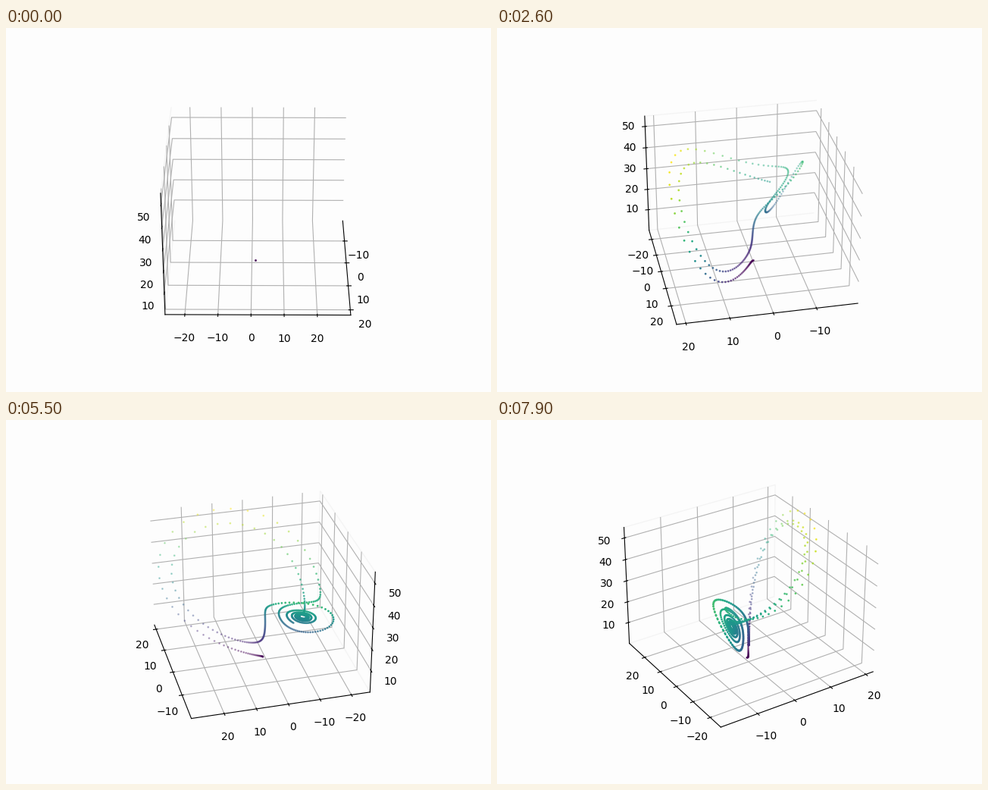
These frames come from a looping animation (640x480 px, 8 s). A matplotlib script:

```python
import numpy as np
import matplotlib.pyplot as plt
from matplotlib.animation import FuncAnimation

FRAMES, INTERVAL = 80, 100
STEPS = 10  # new points per frame
BG = "#fdfdfd"


def lorenz(n, dt=0.01, s=10, r=28, b=8 / 3):
    """Integrate the Lorenz system with plain Euler steps."""
    pts = np.empty((n, 3))
    pts[0] = 0.0, 1.0, 1.05
    for i in range(n - 1):
        x, y, z = pts[i]
        pts[i + 1] = pts[i] + dt * np.array(
            [s * (y - x), r * x - y - x * z, x * y - b * z])
    return pts


def padded(lo, hi):
    pad = (hi - lo) / 48
    return lo - pad, hi + pad


path = lorenz(FRAMES * STEPS + 1)
top = path.max(axis=0)
z_min = path[:, 2].min()

fig = plt.figure(figsize=(6.4, 4.8), dpi=100, facecolor=BG)
ax = fig.add_subplot(projection="3d")
ax.set_facecolor(BG)
ax.set_xlim(*padded(-18.85, top[0]))
ax.set_ylim(*padded(-24.85, top[1]))
ax.set_zlim(*padded(z_min, top[2]))
ax.set_xticks(range(-10, 21, 10))
ax.set_yticks(range(-20, 21, 10))
ax.set_zticks(range(10, 51, 10))

for axis, edge in ((ax.xaxis, "none"), (ax.yaxis, "#ececec"), (ax.zaxis, "none")):
    axis.pane.set_fill(False)
    axis.pane.set_edgecolor(edge)

dots = None


def update(i):
    global dots
    if dots is not None:
        dots.remove()
    n = i * STEPS + 1
    x, y, z = path[:n].T
    dots = ax.scatter(x, y, z, c=z, s=1, cmap="viridis",
                      vmin=z_min, vmax=top[2])
    ax.view_init(elev=30, azim=0.3 * n)
    return dots,


anim = FuncAnimation(fig, update, frames=FRAMES, interval=INTERVAL,
                     init_func=lambda: update(0), repeat=True,
                     repeat_delay=0, blit=False)
plt.show()
```
